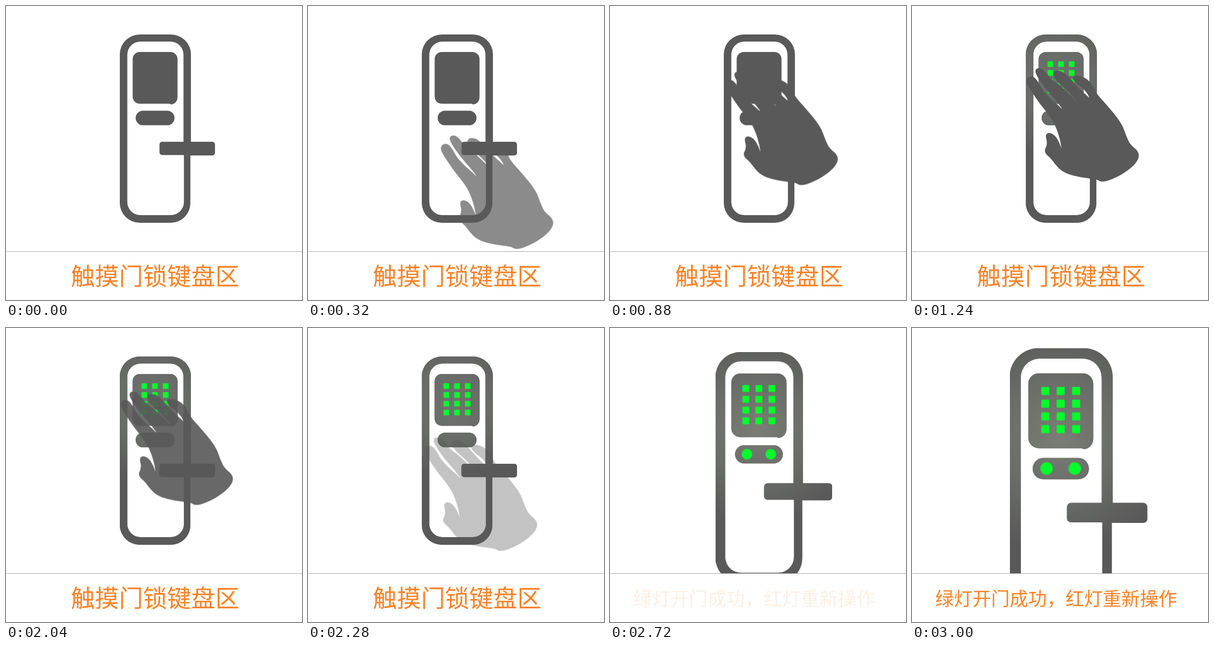
Write an HTML page that moves like this. It is 541 by 537 pixels and loops after 5 s.

```html
<!DOCTYPE html>
<html lang="zh-CN">
<head>
<meta charset="utf-8">
<title>触摸门锁键盘区</title>
<style>
  @property --in { syntax: "<angle>"; inherits: false; initial-value: 0deg; }
  @property --out { syntax: "<angle>"; inherits: false; initial-value: 0deg; }

  html, body { margin: 0; width: 100%; height: 100%; overflow: hidden; background: #fff; }
  svg { display: block; width: 100%; height: 100%; }
  text {
    font-family: "Noto Sans CJK SC", "Noto Sans CJK", sans-serif;
    font-weight: 500; fill: #ff8225; text-anchor: middle;
  }

  .lock, .hand, .keys, .lights, .first, .second { animation: 5s -2ms infinite both; }
  .lock { animation-name: zoom; }
  .keys { animation-name: keys; }
  .lights { animation-name: lights; }
  .first { animation-name: first; }
  .second { animation-name: second; }
  .hand {
    animation-name: fade, reach, leave;
    --p: cos(clamp(0deg, var(--in), 180deg));
    --q: cos(var(--out));
    transform: translate(
      calc(16.75px * (1 + var(--p)) + 3px * (1 - var(--q))),
      calc(61.5px * (1 + var(--p)) + 61px * (1 - var(--q))));
  }

  /* 0.8% is one 40 ms tick */
  @keyframes fade {
    0% { opacity: 0; }
    0.8% { opacity: 0; animation-timing-function: steps(10); }
    8.8% { opacity: 1; }
    40% { opacity: 1; animation-timing-function: steps(11); }
    48.8%, 100% { opacity: 0; }
  }
  @keyframes reach {
    0% { --in: -9.8deg; }
    9.6% { --in: -9.8deg; animation-timing-function: steps(12); }
    19.2%, 100% { --in: 186.5deg; }
  }
  @keyframes leave {
    0% { --out: 0deg; }
    40% { --out: 0deg; animation-timing-function: steps(11); }
    48.8%, 100% { --out: 180deg; }
  }
  @keyframes keys {
    0% { opacity: 0; }
    18.4% { opacity: 0; animation-timing-function: steps(8); }
    24.8%, 100% { opacity: 1; }
  }
  @keyframes zoom {
    0% { transform: translate(0px, 0px) scale(1); }
    48.8% { transform: translate(0px, 0px) scale(1); animation-timing-function: steps(14); }
    60%, 100% { transform: translate(-121.3px, -38.2px) scale(1.443); }
  }
  @keyframes lights {
    0% { opacity: 0; }
    48.8% { opacity: 0; animation-timing-function: steps(6); }
    53.6%, 100% { opacity: 1; }
  }
  @keyframes first {
    0% { opacity: 1; }
    48.8% { opacity: 1; animation-timing-function: steps(6); }
    53.6%, 100% { opacity: 0; }
  }
  @keyframes second {
    0% { opacity: 0; }
    53.6% { opacity: 0; animation-timing-function: steps(8); }
    60%, 100% { opacity: 1; }
  }
</style>
</head>
<body>
<svg viewBox="0 0 541 537">
  <defs>
    <clipPath id="stage"><rect width="541" height="448.5"/></clipPath>
    <radialGradient id="soft" gradientUnits="userSpaceOnUse" cx="262" cy="140" r="135">
      <stop offset="0" stop-color="#6e736e"/>
      <stop offset=".5" stop-color="#686b68"/>
      <stop offset="1" stop-color="#595959"/>
    </radialGradient>
    <radialGradient id="bright" gradientUnits="userSpaceOnUse" cx="270" cy="165" r="145">
      <stop offset="0" stop-color="#7a7e75"/>
      <stop offset=".5" stop-color="#6a6d68"/>
      <stop offset="1" stop-color="#595959"/>
    </radialGradient>
    <g id="body">
      <path fill-rule="evenodd" d="M208 88A37 36 0 0 1 245 52H301A37 36 0 0 1 338 88V260H337V360A36 36 0 0 1 301 396H245A37 36 0 0 1 208 360Z
        M221.7 89V358A24 24 0 0 0 245.7 382H301A24 24 0 0 0 325.2 358V260H324.4V89A24 24 0 0 0 300.4 65H245.7A24 24 0 0 0 221.7 89Z"/>
      <path d="M244.5 84H300.5A13 13 0 0 1 313.5 97V166.500C313.500 174 308 179.700 301.500 179.700L299 178.500H244.500A13 13 0 0 1 231.500 165.500V97A13 13 0 0 1 244.500 84Z"/>
      <rect x="237" y="191.200" width="71" height="26.600" rx="13.300"/>
      <path d="M285.500 248H377A5 5 0 0 1 382 253V268A5 5 0 0 1 377 273H325V272.300H285.500A5 5 0 0 1 280.500 267.300V253A5 5 0 0 1 285.500 248Z"/>
    </g>
    <g id="row">
      <rect id="key" x="247.700" y="101" width="10.300" height="10.300" rx="1.300"/>
      <use href="#key" x="19.550"/>
      <use href="#key" x="39.100"/>
    </g>
  </defs>

  <g clip-path="url(#stage)">
    <g class="lock">
      <use href="#body" fill="#595959"/>
      <g class="keys">
        <use href="#body" fill="url(#soft)"/>
      </g>
      <g class="lights">
        <use href="#body" fill="url(#bright)"/>
      </g>
      <g class="keys" fill="#00ff2a">
        <use href="#row"/>
        <use href="#row" y="16.100"/>
        <use href="#row" y="32.200"/>
        <use href="#row" y="48.300"/>
      </g>
      <g class="lights" fill="#00ff2a">
        <circle cx="254.500" cy="204.300" r="7.900"/>
        <circle cx="290.200" cy="204.300" r="7.900"/>
      </g>
    </g>
    <path class="hand" fill="#595959" d="M273 260C272 246 266 227 259 213C252 200 240 187 232 176
      C223 163 213 149 210 141C207 132 216 125 224 131C231 137 236 150 242 157C252 169 265 178 275 189
      C268 177 258 168 246 153C238 142 229 131 226 122C224 114 232 111 239 116C246 121 252 132 260 138
      C276 149 290 163 302 177C293 162 280 151 272 144C264 137 258 129 258 124C259 117 269 117 276 121
      C288 129 298 143 308 153C314 159 320 163 324 168C322 160 315 153 309 148C302 143 294 136 294 131
      C296 125 306 127 313 130C323 134 329 143 333 151C337 161 346 169 355 180C363 189 379 207 385 220
      C389 229 392 239 396 247C401 257 410 260 413 267C417 274 413 282 407 289C397 300 379 311 366 316
      C356 320 349 322 343 320C339 316 330 316 318 314C303 312 286 309 274 301C264 294 259 284 251 276
      C246 272 242 268 243 262C246 255 248 251 245 241C244 234 247 232 251 232C262 233 269 247 273 260Z"/>
  </g>

  <path d="M1 448.500H541" stroke="#acacac"/>
  <text class="first" x="272.500" y="510" font-size="44">触摸门锁键盘区</text>
  <text class="second" x="263.500" y="507" font-size="34">绿灯开门成功，红灯重新操作</text>
</svg>
</body>
</html>
```
